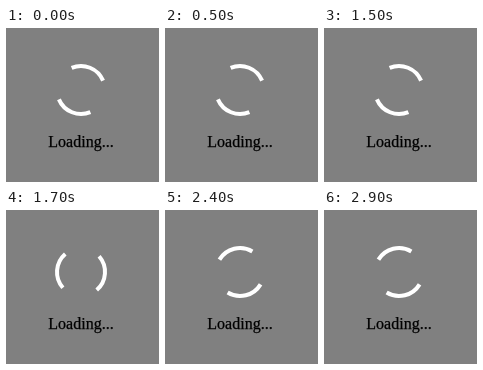
These frames come from a looping animation (153 px wide and 154 px high, 3 s). An HTML page with a canvas:

```html
<!DOCTYPE html>
<html lang="en">
<head>
<meta charset="utf-8">
<title>Loading</title>
<style>
  html, body { margin: 0; width: 100%; height: 100%; overflow: hidden; background: #808080; }
  canvas { display: block; }
</style>
</head>
<body>
<canvas id="stage" width="153" height="154"></canvas>
<script>
const ctx = document.getElementById('stage').getContext('2d');
const CENTER = { x: 75, y: 62 };
const RADIUS = 24;
const LINE_WIDTH = 4;
const STEP_MS = 100;
const LOOP_MS = 3000;
const STEP_ANGLE = Math.PI / 5;
const START_ANGLE = -113 * Math.PI / 180;

function drawArc(start) {
  ctx.beginPath();
  ctx.arc(CENTER.x, CENTER.y, RADIUS, start, start + Math.PI / 2);
  ctx.stroke();
}

function drawLabel(text, x, y) {
  ctx.font = '16px "Liberation Serif", "Times New Roman", serif';
  ctx.textAlign = 'center';
  ctx.fillStyle = ctx.strokeStyle = '#000';
  ctx.lineWidth = 0.25;
  ctx.fillText(text, x, y);
  ctx.strokeText(text, x, y);
}

function draw(time) {
  const step = Math.floor((time % LOOP_MS) / STEP_MS);
  const angle = START_ANGLE + step * STEP_ANGLE;

  ctx.fillStyle = '#808080';
  ctx.fillRect(0, 0, 153, 154);

  ctx.strokeStyle = '#fff';
  ctx.lineWidth = LINE_WIDTH;
  drawArc(angle);
  drawArc(angle + Math.PI);

  drawLabel('Loading...', 75, 119);
}

const origin = performance.now();
function tick() {
  draw(performance.now() - origin);
  requestAnimationFrame(tick);
}
tick();
</script>
</body>
</html>
```
